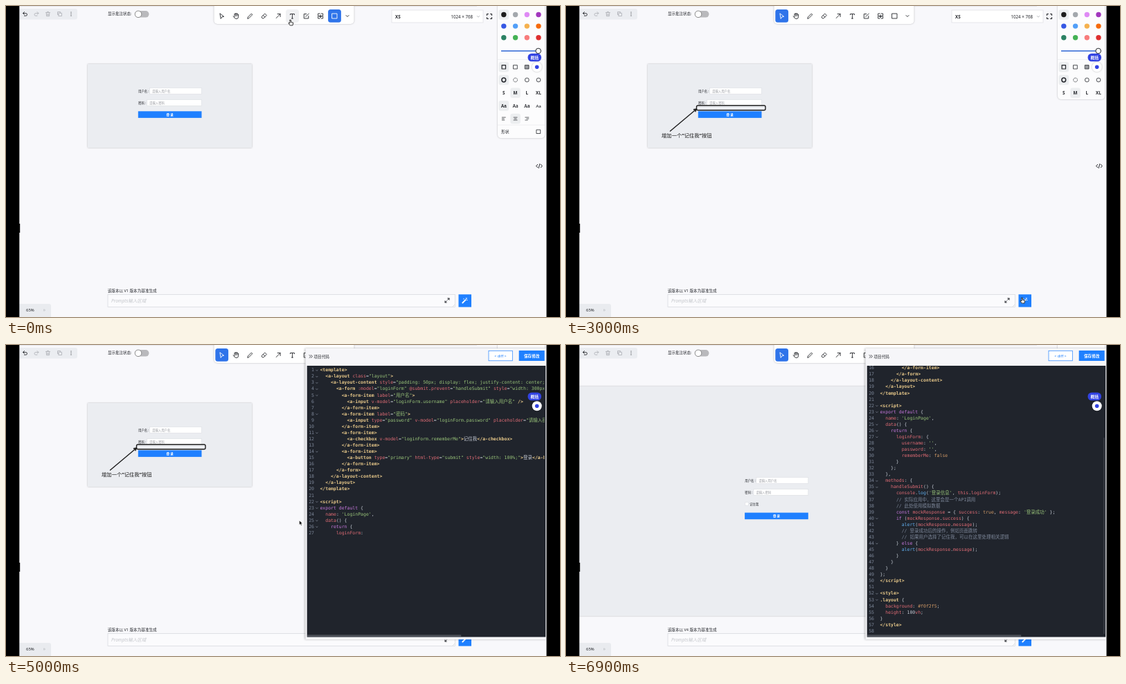
An HTML page for the animation above (7 s loop, 800 by 450 pixels).

```html
<!DOCTYPE html>
<html lang="zh">
<head>
<meta charset="utf-8">
<style>
html, body { margin: 0; height: 100%; overflow: hidden; background: #000; }
svg { display: block; width: 100vw; height: 100vh; font-family: "Noto Sans", "Noto Sans CJK SC", "Noto Sans CJK", sans-serif; }
text { white-space: pre; }
.code { font: 6.5px "DejaVu Sans Mono", "Noto Sans CJK SC", "Noto Sans CJK", monospace; }
.shadow { filter: drop-shadow(0 .8px 1.2px #0004); }
</style>
</head>
<body>
<svg id="stage" viewBox="0 0 800 450"></svg>
<script>
const LOOP = 7000, STEP = 100;
const INK = '#25272c', PALE = '#b4b6bb', BLUE = '#1f80ff', PAGE = '#f8f8fb', CARD = '#ebedf1';

const CODE = `<template>
  <a-layout class="layout">
    <a-layout-content style="padding: 50px; display: flex; justify-content: center; align-items: center;">
      <a-form :model="loginForm" @submit.prevent="handleSubmit" style="width: 300px;">
        <a-form-item label="用户名">
          <a-input v-model="loginForm.username" placeholder="请输入用户名" />
        </a-form-item>
        <a-form-item label="密码">
          <a-input type="password" v-model="loginForm.password" placeholder="请输入密码" />
        </a-form-item>
        <a-form-item>
          <a-checkbox v-model="loginForm.rememberMe">记住我</a-checkbox>
        </a-form-item>
        <a-form-item>
          <a-button type="primary" html-type="submit" style="width: 100%;">登录</a-button>
        </a-form-item>
      </a-form>
    </a-layout-content>
  </a-layout>
</template>

<script>
export default {
  name: 'LoginPage',
  data() {
    return {
      loginForm: {
        username: '',
        password: '',
        rememberMe: false
      }
    };
  },
  methods: {
    handleSubmit() {
      console.log('登录信息', this.loginForm);
      // 实际应用中，这里会是一个API调用
      // 此处使用模拟数据
      const mockResponse = { success: true, message: '登录成功' };
      if (mockResponse.success) {
        alert(mockResponse.message);
        // 登录成功后的操作，例如页面跳转
        // 如果用户选择了记住我，可以在这里处理相关逻辑
      } else {
        alert(mockResponse.message);
      }
    }
  }
};
<\/script>

<style>
.layout {
  background: #f0f2f5;
  height: 100vh;
}
</style>
`;

// SVG helpers
const rect = (x, y, w, h, fill, more = '') => `<rect x="${x}" y="${y}" width="${w}" height="${h}" fill="${fill}" ${more}/>`;
const box = (x, y, w, h, fill, stroke, more = '') => rect(x, y, w, h, fill, `stroke="${stroke}" stroke-width=".7" ${more}`);
const dot = (x, y, r, fill, more = '') => `<circle cx="${x}" cy="${y}" r="${r}" fill="${fill}" ${more}/>`;
const text = (x, y, size, fill, s, more = '') => `<text x="${x}" y="${y}" font-size="${size}" fill="${fill}" ${more}>${s}</text>`;
const icon = (x, y, d, color = INK, width = .9, more = '') =>
  `<path transform="translate(${x} ${y})" d="${d}" fill="none" stroke="${color}" stroke-width="${width}" stroke-linejoin="round" stroke-linecap="round" ${more}/>`;
const group = (s, more = '') => `<g ${more}>${s}</g>`;
const MID = 'text-anchor="middle"', BOLD = 'font-weight="600"';

const clamp = v => Math.max(0, Math.min(1, v));
const ramp = (t, from, to) => clamp((t - from) / (to - from));
const within = (t, from, to) => t >= from && t < to;
const smooth = p => p * p * (3 - 2 * p);

const TOOLS = [
  'M-2.5-3.5L3 .8L.3 1.2L-1.3 3.6Z',
  'M-3.8 .2L-2 2.8Q-1 4 1 4Q3.5 4 3.5 1V-2M-2 1V-3M-.2 0V-4M1.7 0V-3.5M-2-3Q-1-4-.2-3Q1-4.5 1.7-3Q3-3.5 3.5-2',
  'M-3.5 3.5L-3 1.5L2-3.5L3.5-2L-1.5 3Z',
  'M-3.5 1L1-3.5L3.5-1L-1 3.5H-2ZM-1.5-1L1 1.5',
  'M-3 3L3-3M-1-3H3V1',
  'M-3-1.8V-3H3V-1.8M0-3V3.5M-1 3.5H1',
  'M0-3H-3.5V3.5H3V0M-1 1L3.5-3.5',
  'M-3.5-1V-3.5H-1M1-3.5H3.5V-1M3.5 1V3.5H1M-1 3.5H-3.5V1M-3.5 0H3.5M0-1.5V2M-1.5 .5L0 2L1.5 .5',
  'M-3.5-3.5H3.5V3.5H-3.5Z',
  'M-2-1L0 1L2-1'
];
const SELECT = 0, ARROW = 4, TYPE = 5, BOX = 8;

function toolbar(t) {
  const active = t < 300 ? BOX : t < 1300 ? TYPE : within(t, 1700, 2100) ? BOX : within(t, 2300, 2700) ? ARROW : SELECT;
  const x = i => i < 9 ? 311.7 + i * 20.35 : 493;
  return rect(300.5, -4, 202, 30, '#fff', 'rx="5" class="shadow"') +
    (t < 300 ? rect(404, 5, 19, 19, '#f0f1f3', 'rx="4"') : '') +
    rect(x(active) - 9.4, 5, 18.8, 18.8, '#2f74ea', 'rx="3.5"') +
    TOOLS.map((d, i) => icon(x(i), 14.5, d, i === active ? '#fff' : INK)).join('');
}

function header(t) {
  const picked = within(t, 400, 1500) || within(t, 2000, 2300) || within(t, 2600, 2900);
  const edit = picked ? INK : PALE;
  return rect(19, 0, 661, .7, '#dedfe6') +
    rect(15, 4, 88, 15.5, CARD, 'rx="3"') +
    icon(27.5, 11.5, 'M-1-3L-3-1L-1 1M-3-1H1Q3-1 3 1Q3 2.7 1 2.7H-1') +
    icon(44, 11.5, 'M1-3L3-1L1 1M3-1H-1Q-3-1-3 1Q-3 2.7-1 2.7H1', PALE) +
    icon(60.5, 11.5, 'M-3-2H3M-1-2V-3.2H1V-2M-2.3-2L-2 3.2H2L2.3-2M-.7 0V2M.7 0V2', edit) +
    icon(77.5, 11.5, 'M-1.3-1.3H3V3H-1.3ZM-1.3 1H-3V-3H1V-1.3', edit) +
    [-2.4, 0, 2.4].map(d => dot(94, 11.5 + d, .6, INK)).join('') +
    text(147, 13.3, 5.5, INK, '显示批注状态:') +
    rect(186, 7, 20.5, 9.6, '#b9b9bc', 'rx="4.8"') + dot(191, 11.8, 4.8, '#fff', 'stroke="#777" stroke-width=".8"') +
    box(557, 6, 132, 18, '#fff', '#dcdde1') + text(562, 17.7, 6.3, INK, 'XS', BOLD) +
    text(642.5, 17.5, 6.2, INK, '1024 × 768') + icon(682, 15.3, 'M-1.7-.9L0 .9L1.7-.9', PALE) +
    icon(698, 15, 'M-3.5-1.5V-3.5H-1.5M1.5-3.5H3.5V-1.5M3.5 1.5V3.5H1.5M-1.5 3.5H-3.5V1.5', INK, 1.1) +
    icon(770, 231.5, 'M-2.2-2.2L-4.5 0L-2.2 2.2M2.2-2.2L4.5 0L2.2 2.2M.8-3L-.8 3', INK, 1);
}

// Style panel
const COLS = [718.8, 735.6, 752.3, 769];
const SWATCHES = ['#1d1d1d', '#a3a8ad', '#df8af5', '#a136bd', '#3658e4', '#529ff8', '#f5b14e', '#f66a0b', '#2c8264', '#45b255', '#f87c7c', '#de2f2f'];
const SQUARE = 'M-2.7-2.7H2.7V2.7H-2.7Z';
const ROWS = {
  fill: y => COLS.map((x, i) => icon(x, y, SQUARE, INK, i ? .8 : 1.2, i === 2 ? 'style="fill:#9a9ca1"' : '')).join(''),
  dash: y => COLS.map((x, i) => dot(x, y, 2.9, 'none', `stroke="${INK}" stroke-width="${i ? .8 : 1.5}" ${i === 1 ? 'stroke-dasharray="1.5 .7"' : ''}`)).join(''),
  size: y => ['S', 'M', 'L', 'XL'].map((s, i) => text(COLS[i], y + 2.3, 6.3, INK, s, MID + ' ' + BOLD)).join(''),
  font: y => ['sans-serif', 'Inter, sans-serif', 'Noto Serif, serif', 'Lato, sans-serif'].map((f, i) =>
    text(COLS[i], y + 2.3, 6.3, INK, 'Aa', `${MID} font-family="${f}" font-weight="${i ? 600 : 800}"`)).join(''),
  align: y => [-2.5, -1.5, -.5].map((s, i) => icon(COLS[i], y, `M-2.5-2H2.5M${s} 0h3M-2.5 2H${i === 1 ? 2.5 : 1}`, INK, .7)).join(''),
  shape: y => rect(710, y - 10, 68, .6, '#e3e4e8') + text(715, y + 2.2, 5.8, INK, '形状') + icon(769, y, SQUARE, INK, .8)
};
const CHOSEN = { fill: 0, dash: 0, size: 1, font: 0, align: 1 };
const PANELS = {
  basic: ['fill', 'dash', 'size'],
  text: ['size', 'font', 'align'],
  full: ['fill', 'dash', 'size', 'font', 'align', 'shape']
};

function stylePanel(t) {
  const kind = t < 300 ? 'full' : t < 1500 ? 'text' : within(t, 1700, 2900) ? 'full' : 'basic';
  const rows = PANELS[kind];
  const pick = (x, y) => rect(x - 7.3, y - 7.3, 14.6, 14.6, '#eceef0', 'rx="3"');
  return rect(710, -5, 68, 84 + rows.length * 18.7, '#fcfcfd', 'rx="5" class="shadow"') + pick(COLS[0], 12.5) +
    SWATCHES.map((c, i) => dot(COLS[i % 4], 12.5 + (i >> 2) * 16.6, 3.7, c)).join('') +
    rect(715, 64.3, 54, 1.5, '#2d66d6') + dot(768.7, 65, 3.8, '#fff', `stroke="${INK}"`) +
    rect(710, 77, 68, .6, '#e8e9ed') +
    rows.map((name, i) => {
      const y = 88.3 + i * 18.7;
      return (name in CHOSEN ? pick(COLS[CHOSEN[name]], y) : '') + ROWS[name](y);
    }).join('');
}

function loginForm(dx, dy, remember) {
  const grow = remember ? 17.3 : 0;
  return group(
    text(191, 124.8, 4.4, INK, '用户名 :') + box(207.5, 118.5, 75, 8.8, '#fff', '#dfe1e5') + text(211, 124.7, 4.4, '#9a9ca2', '请输入用户名') +
    text(191, 141.8, 4.4, INK, '密码 :') + box(203.7, 135.6, 78.8, 8.8, '#fff', '#dfe1e5') + text(207, 141.7, 4.4, '#9a9ca2', '请输入密码') +
    (remember ? box(191.5, 154.6, 4.6, 4.6, '#fff', '#dfe1e5') + text(198, 158.9, 4.3, INK, '记住我') : '') +
    rect(190.8, 152.3 + grow, 91.7, 9.6, BLUE) + text(236.7, 158.8 + grow, 4.5, '#fff', '登 录', MID + ' font-weight="700"'),
    `transform="translate(${dx} ${dy})"`);
}

function annotations(t) {
  const note = '增加一个“记住我”按钮';
  const typed = note.slice(0, Math.round(note.length * ramp(t, 600, 1200)));
  const w = 99.5 * ramp(t, 1800, 2050), a = ramp(t, 2400, 2650);
  const x = 150.5 + 38 * a, y = 181 - 32 * a;
  return text(138, 190.2, 7.35, '#1d1d1d', typed.replace(/[“”]/g, '<tspan font-weight="700">”</tspan>')) +
    (w ? `<rect x="188.5" y="144" width="${w}" height="${6.7 * w / 99.5}" rx="2" fill="none" stroke="#1d1d1d" stroke-width="1.4"/>` : '') +
    (a ? icon(0, 0, `M150.5 181L${x} ${y}m-4 .8l4-.8l-1.6 3.7`, '#1d1d1d', 1.4) : '');
}

function canvasArea(t) {
  if (t >= 6500) return rect(19, 60, 570, 332, CARD, 'class="shadow"') + loginForm(67.3, 73, true);
  if (t >= 6400) return '';
  return rect(118, 84, 237, 121, CARD, 'class="shadow"') + loginForm(0, 0, false) + annotations(t);
}

const footer = t =>
  text(146.7, 413.5, 5.6, INK, `该版本以 V${t < 6500 ? 1 : 4} 版本为基准生成`) +
  box(147, 417.5, 501.5, 18, '#fbfbfd', '#d5d7dc') + text(152, 428.6, 6.5, '#c3c5ca', 'Prompts输入区域', 'font-style="italic"') +
  icon(637, 426, 'M.8-.8L3-3M.8-3H3V-.8M-.8 .8L-3 3M-.8 3H-3V.8', INK, 1) + icon(646.5, 433.5, 'M-1 1L1-1', PALE, .5) +
  rect(653.5, 417.3, 18.5, 18.3, BLUE) + icon(662.5, 426.3, 'M-3.2 3.2L1.2-1.2', '#fff', 1.8) +
  icon(662.5, 426.3, 'M2-4V-2.5M3.8-.8H2.8M3.5-3.5L2.5-2.5M-1.5-3V-2', '#fff', .8) +
  rect(15, 431, 50, 22, '#e9ebef', 'rx="3"') + text(29, 442.2, 6, INK, '65%') + text(53.5, 442, 7, PALE, '»');

// Code editor
const LINE = 9.06;
const lines = CODE.split('\n');
const indent = s => s.search(/\S|$/);
const foldable = lines.map((s, i) => s && (/^<(script|style)/.test(s) || indent(lines[i + 1] || '') > indent(s)));
const escape = s => s.replace(/&/g, '&amp;').replace(/</g, '&lt;');
const TOKEN = /(\/\/.*)|('[^']*'?|"[^"]*"?)|(<\/?[\w-]*|\/?>|^\.\w+)|(\b(?:export|default|return|const|if|else)\b)|(\b(?:true|false|\d+)\b|#\w+)|(\b(?:alert|log)\b)|([:@]?[a-zA-Z][\w-]*)/g;
const TONES = ['#7d8799', '#98c379', '#e8c98a', '#c678dd', '#d19a66', '#61afef', '#e06c75'];
const paint = s => {
  let html = '', last = 0;
  for (const m of s.matchAll(TOKEN)) {
    const kind = m.slice(1).findIndex(Boolean);
    html += escape(s.slice(last, m.index)) + `<tspan fill="${TONES[kind]}"${kind === 2 ? ' font-weight="700"' : ''}>${escape(m[0])}</tspan>`;
    last = m.index + m[0].length;
  }
  return html + escape(s.slice(last));
};

const markA = CODE.indexOf('loginForm.password'), markB = CODE.indexOf('处理相关');
const typedLength = t => Math.max(0, Math.round(markA + (t - 4300) * (markB - markA) / 1300));

function editor(t) {
  const shown = CODE.slice(0, typedLength(t)).split('\n');
  const count = shown.length, wide = count > 9 ? 2.4 : 0;
  const scroll = Math.max(0, (count - 1) * LINE - 377.5);
  const number = (i, y) => text(442.6 + wide, y, 6.5, '#7d8799', i + 1, 'text-anchor="end"');
  let html = '';
  shown.forEach((s, i) => {
    const y = 38.3 + i * LINE - scroll;
    if (y < 25) return;
    html += number(i, y) + text(451 + wide, y, 6.5, '#c3c9d3', paint(s)) +
      (foldable[i] && i < count - 1 ? icon(446.5 + wide, y - 1.5, 'M-1.2-.6L0 .6L1.2-.6', '#8a93a3', .7) : '');
  });
  if (!typedLength(t)) html += text(451, 38.3, 6.5, '#8c929c', 'Code goes here...');
  if (count > 2) html += rect(435, 419.3, 227 - wide * 2, 3, '#4b4f57');
  if (scroll) {
    const h = 388 * 388 / (count * LINE + 5);
    html += rect(776.5, 418 - h, 2.5, h, '#4b4f57');
  }
  return rect(434.7, 30, 344.5, 392.5, '#20242c') + group(html, 'class="code" clip-path="url(#editor)"');
}

function drawer(t) {
  const p = ramp(t, 3150, 3500);
  if (!p) return '';
  return group(
    rect(432.5, 5, 348, 421, '#f6f6f9', 'style="filter:drop-shadow(-1px 0 1.5px #0004)"') +
    icon(440, 16.5, 'M-2-2L0 0L-2 2M.5-2L2.5 0L.5 2', INK, .8) + text(444.5, 18.8, 5.6, INK, '项目代码') +
    box(697, 8.3, 34.3, 14.5, '#fff', BLUE) + text(714, 17.7, 5.4, BLUE, '&lt; diff >', MID) +
    rect(740.7, 8, 37, 15, BLUE) + text(759.2, 17.5, 5.6, '#fff', '保存修改', MID + ' ' + BOLD) + editor(t),
    `transform="translate(${348 * (1 - p) ** 3} 0)"`);
}

function loading(t) {
  const p = Math.min(ramp(t, 3100, 3300), 1 - ramp(t, 3700, 3850));
  if (!p) return '';
  const spin = (t - 3700) / 1200 * 2 * Math.PI;
  const dots = [.9, 1, .4, .5].map((o, i) => {
    const a = spin + (256 + i * 90) * Math.PI / 180;
    return dot(338 + 6.3 * Math.cos(a), 222 + 6.3 * Math.sin(a), 2.6, '#1688ff', `opacity="${o}"`);
  }).join('');
  return rect(19, 0, 761, 450, '#fff', `opacity="${.36 * p}"`) +
    group(dots + text(338, 239.6, 6.5, '#1688ff', '代码拼命生成中...', MID), `opacity="${p}"`);
}

const assistant = rect(753.5, 68.7, 19.5, 11.6, '#3243e2', 'rx="5.5"') +
  text(763.2, 76.8, 5.8, '#fff', '概括', MID + ' font-weight="700"') +
  dot(766.7, 88.3, 7, '#fff', 'class="shadow"') + dot(766.7, 88.3, 2.8, '#3243e2');

// Pointer stops: time, x, y
const STOPS = [
  [0, 411, 22], [300, 411, 20], [500, 138, 185], [1400, 138, 185], [1650, 474, 15], [1800, 188, 144], [2050, 288, 151],
  [2250, 393, 15], [2400, 150, 181], [2650, 188, 149], [2900, 659, 424], [3100, 659, 424], [3500, 420.5, 250], [3800, 420.5, 250], [4100, 423.5, 254]
];
function pointer(t) {
  if (within(t, 500, 1500) || t >= 5900) return '';
  const i = STOPS.findIndex(s => s[0] > t);
  let [, x, y] = STOPS.at(-1);
  if (i > 0) {
    const [a, b] = [STOPS[i - 1], STOPS[i]], p = smooth(ramp(t, a[0], b[0]));
    x = a[1] + (b[1] - a[1]) * p;
    y = a[2] + (b[2] - a[2]) * p;
  }
  const hand = t <= 300 || within(t, 2900, 3200);
  return hand
    ? icon(x, y, 'M-1-1.5V3L-2.5 2L-3 3L-.8 6H3L3.8 2.2L.6 1.4V-1.5Q-.2-2.4-1-1.5Z', '#222', .9, 'style="fill:#fff"')
    : icon(x, y, 'M0 0V6.2L1.5 5L2.6 7.2L3.7 6.7L2.7 4.5H4.6Z', '#fff', .5, 'style="fill:#111"');
}

const clip = '<clipPath id="editor"><rect x="435" y="30" width="342.5" height="392.5"/></clipPath>';
const frame = rect(0, 0, 19.3, 450, '#000') + rect(780.5, 0, 19.5, 450, '#000') + rect(19, 315, 1.2, 13, '#000');

const scene = t => clip + rect(0, 0, 800, 450, PAGE) + canvasArea(t) + header(t) + toolbar(t) + stylePanel(t) +
  footer(t) + drawer(t) + loading(t) + assistant + pointer(t) + frame;

const stage = document.getElementById('stage');
let drawn = -1;
function tick() {
  const t = Math.floor(performance.now() % LOOP / STEP) * STEP;
  if (t !== drawn) stage.innerHTML = scene(drawn = t);
  requestAnimationFrame(tick);
}
tick();
</script>
</body>
</html>
```
